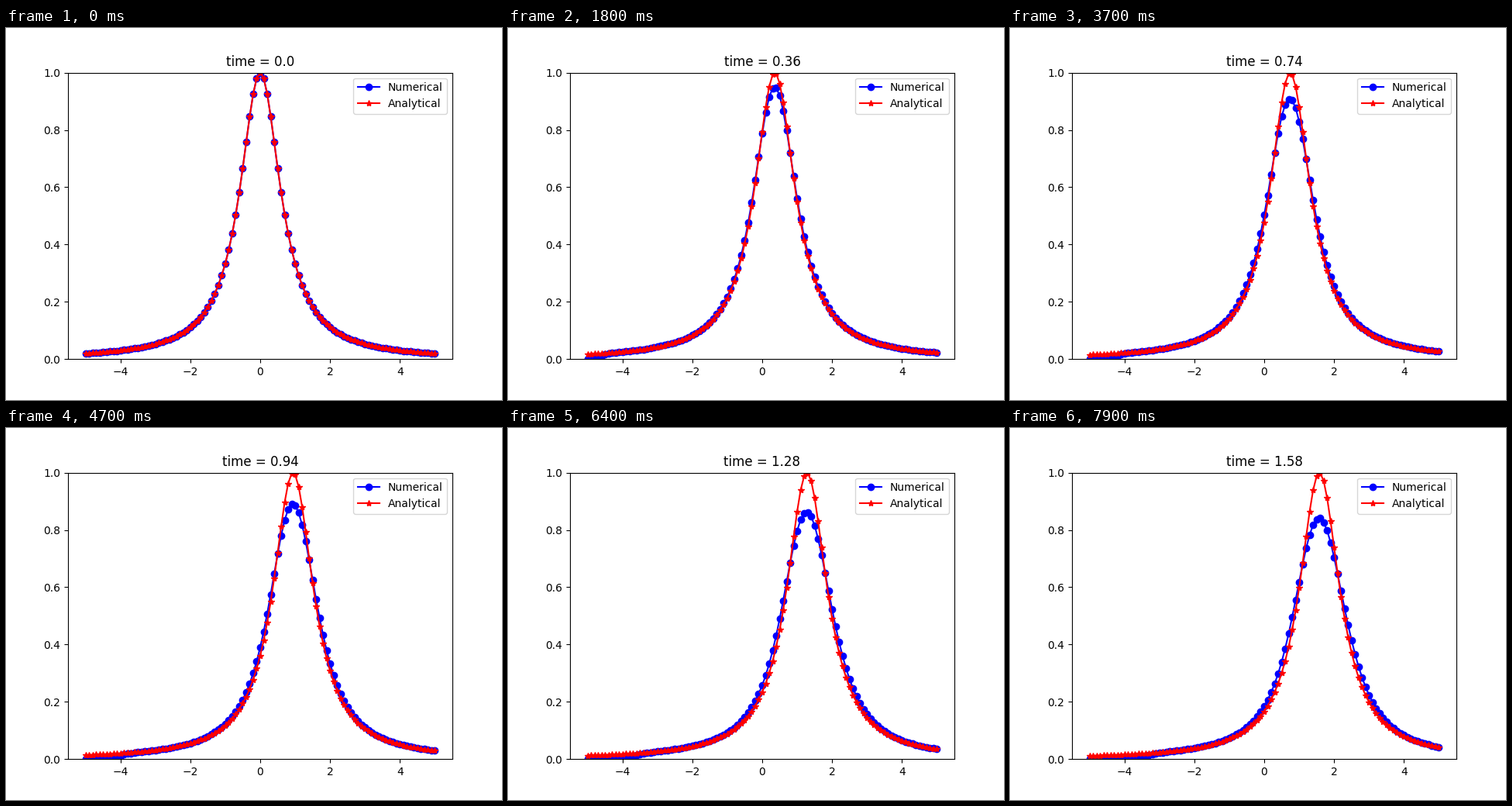
A matplotlib script for the animation above (8 s loop, 640 by 480 pixels).

```python
import numpy as np
import matplotlib.pyplot as plt
from matplotlib.animation import FuncAnimation

STEPS = 80
DT = 0.02
SPEED = 1.0
x = np.linspace(-5, 5, 101)
courant = SPEED * DT / (x[1] - x[0])


def pulse(s):
    return 1 / (1 + 2 * s**2)


def solve_upwind():
    """First-order upwind advection with zero inflow on the left."""
    u = pulse(x)
    history = [u]
    for _ in range(STEPS - 1):
        nxt = np.zeros_like(u)
        nxt[1:] = u[1:] - courant * (u[1:] - u[:-1])
        history.append(nxt)
        u = nxt
    return history


numerical = solve_upwind()

fig, ax = plt.subplots(figsize=(6.4, 4.8), dpi=100)
num_line, = ax.plot(x, numerical[0], "bo-", label="Numerical")
ana_line, = ax.plot(x, pulse(x), "r*-", label="Analytical")
ax.set_xlim(-5.5, 5.5)
ax.set_ylim(0, 1)
ax.legend(loc="upper right")
title = ax.set_title("time = 0.0")


def update(i):
    t = round(i * DT, 2)
    num_line.set_ydata(numerical[i])
    ana_line.set_ydata(pulse(x - SPEED * t))
    title.set_text(f"time = {t}")
    return num_line, ana_line, title


anim = FuncAnimation(fig, update, frames=STEPS, interval=100,
                     repeat=True, repeat_delay=0, blit=False)
plt.show()
```
